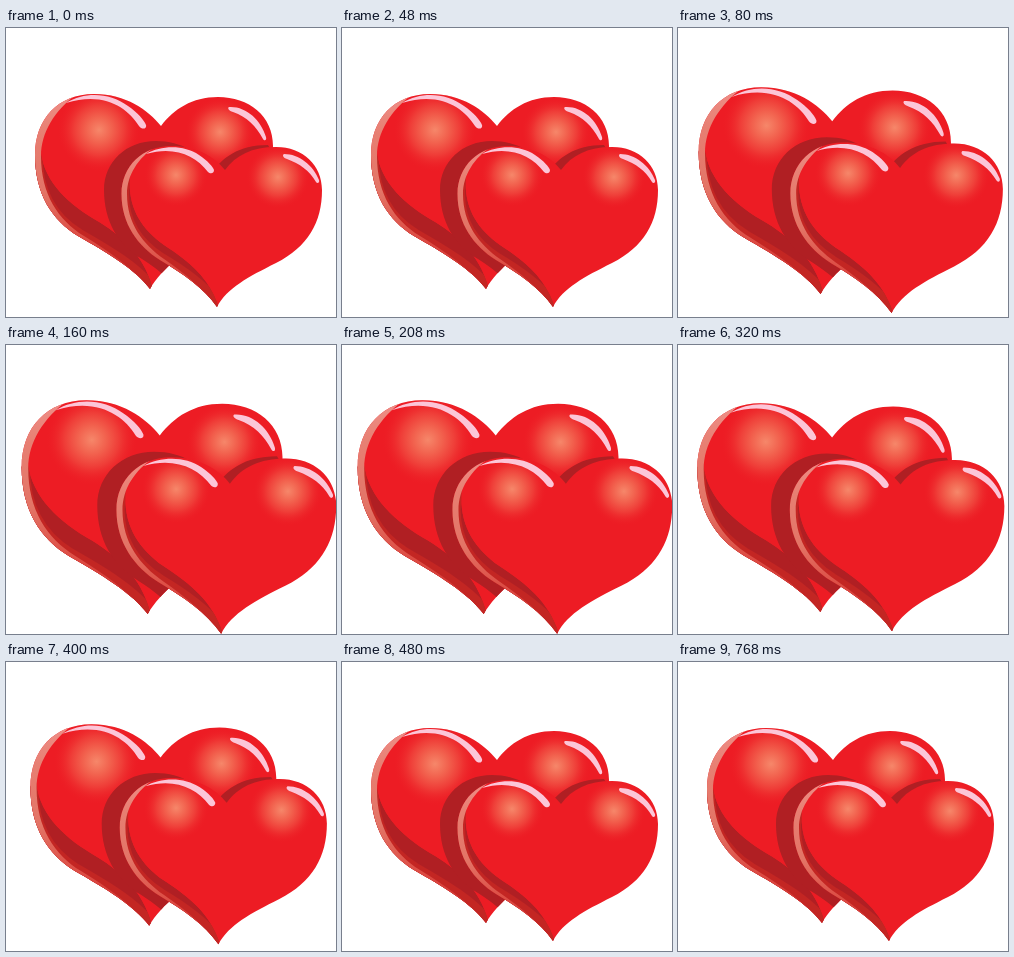
These frames come from a looping animation (330x289 px, 960 ms). An HTML page with a canvas:

```html
<!DOCTYPE html>
<html lang="en">
<head>
<meta charset="utf-8">
<title>Beating hearts</title>
<style>
  html, body { margin: 0; width: 100%; height: 100%; overflow: hidden; background: #fff; }
  canvas { display: block; width: 330px; height: 289px; }
</style>
</head>
<body>
<canvas id="stage"></canvas>
<script>
const W = 330, H = 289, LOOP = 960, STEP = 80;
const RED = '#ed1c24', DARK = '#b01f23', FOLD = '#c32623', SHINE = '#fcc6d8';
const CENTER = { x: 168, y: 177 };
// Heart size at each beat step; it rests at 1 for the remainder of the loop.
const BEAT = [1, 1.06, 1.096, 1.084, 1.07, 1.033];

const canvas = document.getElementById('stage');
const ctx = canvas.getContext('2d');
const dpr = window.devicePixelRatio || 1;
canvas.width = W * dpr;
canvas.height = H * dpr;

const back = {
  body: new Path2D('M155 98C142 82 120 66 88 66C52 66 29 91 29 127C29 166 46 192 72 208C102 225 130 242 144 261C156 240 180 222 210 205C245 185 267 155 267 118C267 88 243 69 212 69C186 69 168 81 155 98Z'),
  fold: new Path2D('M34 118C36 150 58 173 88 191C116 207 138 228 146 258L144 265L100 240L40 200L20 140Z'),
  rim: new Path2D('M72 65C44 72 27 97 27 127C27 168 46 192 72 210C102 228 130 244 144 261C128 241 104 224 78 208C52 192 35 166 35 128C35 104 49 82 72 65Z'),
  shadow: new Path2D('M206 145C194 125 176 113 150 113C120 113 98 134 98 162C98 193 112 217 136 231C150 240 160 248 172 262L220 150L270 130L262 117C232 117 216 130 206 145Z'),
  shines: [
    new Path2D('M60 75C80 63 104 65 122 78C132 85 138 92 140 97C141 101 136 102 133 98C122 80 98 63 60 75Z'),
    new Path2D('M223 79C240 78 255 92 260 109C261 113 258 113 257 111C250 98 241 89 227 84C223 83 221 80 223 79Z')
  ],
  glows: [[93, 102, 42], [214, 104, 35]],
  top: 66, bottom: 261
};

const front = {
  body: new Path2D('M219 142C208 128 190 118 165 118C137 118 115.5 138 115.5 166C115.5 196 132 218 154 232C176 245 198 260 211 279C221 260 242 249 270 235C302 219 316 194 316 162C316 137 297 119 270 119C246 119 230 127 219 142Z'),
  fold: new Path2D('M124 146C121 178 134 200 158 217C184 234 203 250 212 277L211 285L150 250L110 200L112 160Z'),
  rim: new Path2D('M150 118C126 125 114 144 114 166C114 198 132 221 154 235C176 248 198 262 211 279C197 260 178 245 158 231C137 216 121 196 121 166C121 147 132 130 150 118Z'),
  shines: [
    new Path2D('M140 126C156 117 178 117 193 127C202 133 207 139 208 142C208 146 204 146 202 144C189 127 168 118 140 126Z'),
    new Path2D('M278 126C293 126 307 137 313 152C314 155 311 156 310 154C303 142 294 136 281 131C277 130 276 127 278 126Z')
  ],
  glows: [[170, 147, 32], [272, 149, 32]],
  top: 118, bottom: 279
};

function fill(path, style) {
  ctx.fillStyle = style;
  ctx.fill(path);
}

function ramp(gradient, stops) {
  stops.forEach(([at, color]) => gradient.addColorStop(at, color));
  return gradient;
}

function glow([x, y, r]) {
  ctx.fillStyle = ramp(ctx.createRadialGradient(x, y, 0, x, y, r), [
    [0, '#f6876a'], [0.3, '#f2634f'], [0.6, '#ef3c37'], [1, 'rgba(237,28,36,0)']
  ]);
  ctx.fillRect(x - r, y - r, 2 * r, 2 * r);
}

// Dark inner crease with a lighter band along the outline.
function crease(h) {
  ctx.save();
  ctx.clip(h.fold);
  fill(h.fold, DARK);
  ctx.strokeStyle = FOLD;
  ctx.lineWidth = 15;
  ctx.stroke(h.body);
  ctx.restore();
}

function heart(h) {
  ctx.save();
  fill(h.body, RED);
  ctx.clip(h.body);
  h.glows.forEach(glow);
  crease(h);
  fill(h.rim, ramp(ctx.createLinearGradient(0, h.top, 0, h.bottom), [
    [0, '#ee8f88'], [0.2, '#e77f72'], [0.5, '#e37466'], [0.75, '#dc4a42'], [1, '#cb2a29']
  ]));
  if (h.shadow) fill(h.shadow, DARK);
  h.shines.forEach(s => fill(s, SHINE));
  ctx.restore();
}

function draw(now) {
  const size = BEAT[Math.floor((now % LOOP) / STEP)] || 1;
  ctx.setTransform(dpr, 0, 0, dpr, 0, 0);
  ctx.fillStyle = '#fff';
  ctx.fillRect(0, 0, W, H);
  ctx.translate(CENTER.x, CENTER.y);
  ctx.scale(size, size);
  ctx.translate(-CENTER.x, -CENTER.y);
  heart(back);
  heart(front);
}

let start;
function tick(now) {
  start ??= now;
  draw(now - start);
  requestAnimationFrame(tick);
}
draw(0);
requestAnimationFrame(tick);
</script>
</body>
</html>
```
